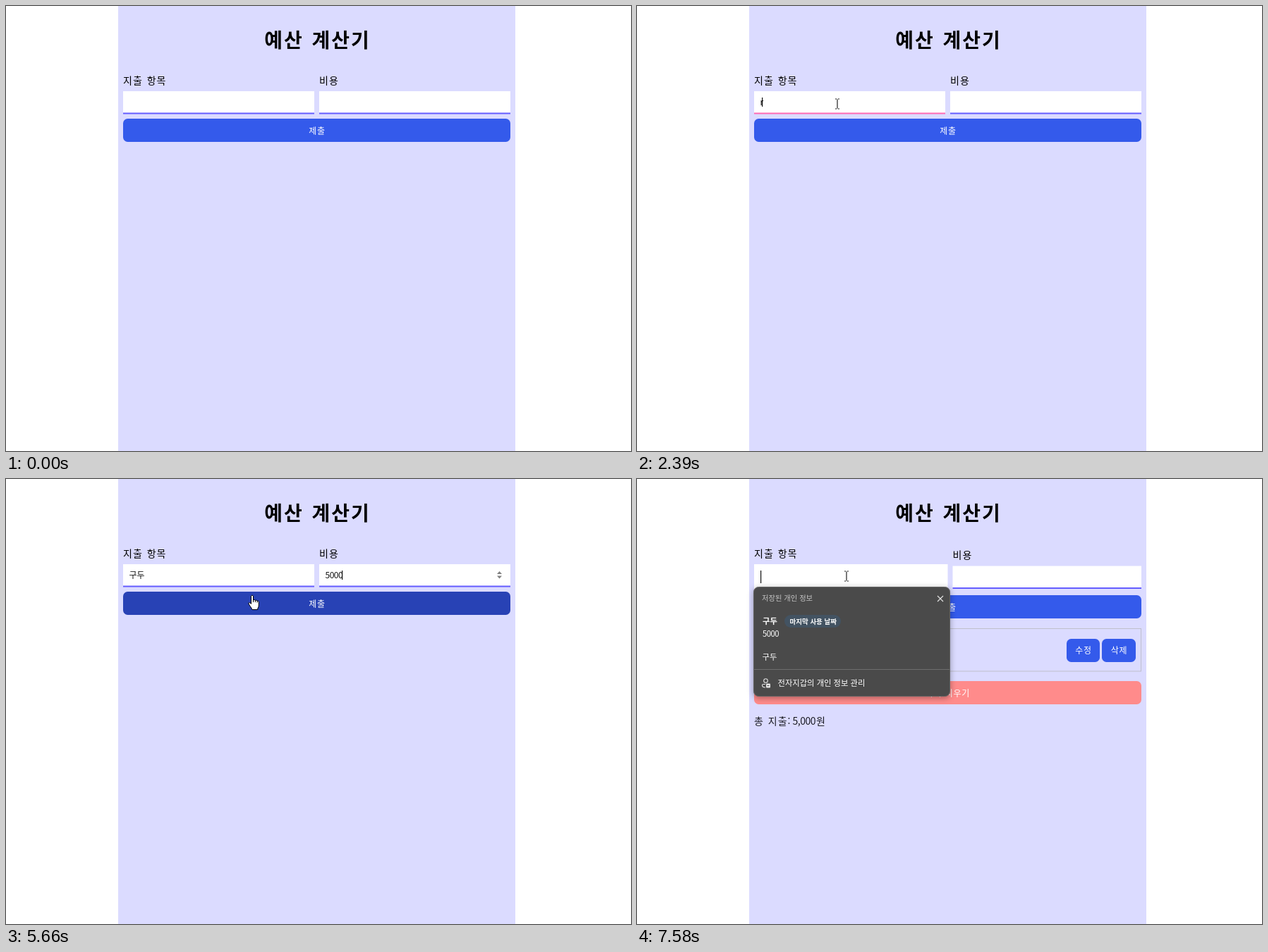
An HTML page for the animation above (8 s loop, 886 by 632 pixels).

```html
<!DOCTYPE html>
<html lang="ko">
<head>
<meta charset="utf-8">
<title>예산 계산기</title>
<style>
  html, body { margin: 0; width: 100%; height: 100%; overflow: hidden; background: #fff; }
  svg { display: block; width: 886px; height: 632px; }
  text { font: 14px "Noto Sans CJK KR", "Noto Sans CJK", "Noto Sans", sans-serif; fill: #1a1a22; white-space: pre; }
  .mid { text-anchor: middle; }
  .spaced { letter-spacing: 1px; word-spacing: 1px; }
  .num { letter-spacing: -.5px; }
  h1, .title { font-size: 28px; font-weight: 700; letter-spacing: 2px; word-spacing: 2px; fill: #000; }
  .label { font-weight: 500; fill: #000; }
  .btn { fill: #345aeb; }
  .btn-text { font-size: 12px; letter-spacing: .8px; fill: #fff; }
  .field-text { font-size: 12px; fill: #111; }
  .popup text { fill: #fff; font-size: 11.3px; }
  .popup .head { font-size: 10.3px; fill: #c4c4c4; }
  .popup .bold { font-weight: 700; }
  .popup .tag { font-size: 9.5px; font-weight: 700; }
  .popup { filter: drop-shadow(0 2px 4px rgba(0, 0, 0, .35)); }
  .line { fill: none; stroke: #e4e4e4; stroke-width: 1.1; }
</style>
</head>
<body>
<svg viewBox="0 0 886 632">
  <rect x="159" width="563" height="632" fill="#dbdbff"/>
  <text class="title mid" x="441.5" y="59">예산 계산기</text>

  <text class="label spaced" x="166" y="110.5">지출 항목</text>
  <rect id="itemBox" x="166" y="121" fill="#fff"/>
  <rect id="itemLine" x="166" height="2"/>
  <text id="item" class="field-text" x="174.5" y="141"></text>

  <g id="cost">
    <text id="costLabel" class="label spaced" y="110.5">비용</text>
    <rect id="costBox" y="121" height="32" fill="#fff"/>
    <rect id="costLine" y="151.5" height="2" fill="#645cff"/>
    <text id="costText" class="field-text num" x="452.5" y="140.5"></text>
    <path id="spin" d="M696 135l3.5-4 3.5 4zM696 137.500l3.500 4 3.500-4z" fill="#808080"/>
  </g>
  <rect id="caret" y="130" width="1.2" fill="#111"/>

  <g id="lower">
    <rect id="submit" x="166" y="160" width="549" height="33" rx="6.500"/>
    <text class="btn-text mid" x="441" y="181.500">제출</text>
    <g id="result">
      <rect x="166.500" y="207.500" width="548" height="60.500" fill="none" stroke="#bfbfcb"/>
      <text x="174" y="243" letter-spacing=".7">구두</text>
      <text class="num" x="390.500" y="243">5000</text>
      <rect class="btn" x="609" y="222" width="47" height="33" rx="6.500"/>
      <rect class="btn" x="659" y="222" width="48" height="33" rx="6.500"/>
      <text class="btn-text mid" x="633" y="243">수정</text>
      <text class="btn-text mid" x="683.500" y="243">삭제</text>
      <rect x="166" y="282" width="549" height="33" rx="6.500" fill="#ff8b8b"/>
      <text class="btn-text mid" x="440.500" y="303.500">목록 지우기</text>
      <text class="spaced" x="166" y="343.500">총 지출:</text>
      <text class="num" x="220.500" y="343.500">5,000</text>
      <text x="254" y="343.500">원</text>
    </g>
  </g>

  <g id="popup" class="popup">
    <rect x="165.500" y="153.500" width="278" height="155" rx="7" fill="#4a4a4a" stroke="#626262"/>
    <text class="head" x="177" y="173">저장된 개인 정보</text>
    <path class="line" d="M426 166l8 8m0-8l-8 8"/>
    <text class="bold" x="178" y="205.500">구두</text>
    <rect x="209" y="193" width="80" height="18" rx="9" fill="#435362"/>
    <text class="tag" x="216.500" y="205.500">마지막 사용 날짜</text>
    <text class="num" x="178" y="223.500">5000</text>
    <text x="177.500" y="256.500">구두</text>
    <path d="M166 270.500h277" stroke="#6e6e6e"/>
    <circle class="line" cx="182.500" cy="286.500" r="2.800"/>
    <path class="line" d="M182 291.500h-3q-1.500 0-1.500 1.500 0 3 4.500 3"/>
    <rect x="183" y="290.500" width="6" height="6" rx="1" fill="#e4e4e4"/>
    <path d="M184.500 293.500h3" stroke="#4a4a4a"/>
    <text x="199.500" y="293.500">전자지갑의 개인 정보 관리</text>
  </g>

  <g id="pointer">
    <path id="arrow" d="M0 0V16.500L3.800 13l2.500 6 2.600-1.100-2.500-5.900H11.500Z" fill="#fff" stroke="#000"/>
    <g id="hand" stroke="#000" stroke-linejoin="round">
      <path d="M-1.500 1.200q1.500-2.400 3 0V7q1.800-1.400 2.800.4 2-1 2.800.8 2.200-.6 2.200 1.400V14q0 3-1.500 5v1.500H0q-1-2.500-3-5-2.200-3-2.200-4.200 1.800-1.800 3.700 1Z" fill="#fff"/>
      <path d="M1.500 7v3M4.300 7.400V10M7.100 8.200V10.500" fill="none"/>
    </g>
    <path id="beam" d="M-3-7h2.200M.8-7H3M0-6.500v13M-3 7h2.200M.8 7H3" fill="none" stroke="#222" stroke-width="1.200"/>
  </g>
  <circle id="press" r="10.500" fill="#ff0" opacity=".55"/>
</svg>

<script>
const LOOP = 8000, STEP = 50;
const el = {};
document.querySelectorAll('[id]').forEach(n => el[n.id] = n);

// Each track holds [start time, value].
const itemTrack = [[0, ''], [1930, 'r'], [2030, 'rn'], [2390, 'r'], [2540, ''], [2790, 'ㄱ'],
  [2960, '구'], [3040, '굳'], [3110, '구두'], [5960, '']];
const costTrack = [[0, ''], [3970, '5'], [4170, '50'], [4320, '500'], [4490, '5000'], [5960, '']];
const caretTrack = [[0, 0], [870, 175], [1380, 0], [1880, 175], [1930, 178], [2030, 183], [2390, 177],
  [2540, 175], [2590, 0], [2790, 186], [3110, 197], [3260, 452], [3820, 0], [3970, 458], [4170, 464],
  [4320, 470], [4490, 476], [5040, 0], [5540, 476], [5860, 0], [6530, 175], [7070, 0], [7580, 175]];
// Pointer moves: quadratic curves with a slowing end.
const moves = [
  { from: 100, to: 750, pts: [[775, 506], [360, 260], [284, 139]] },
  { from: 5240, to: 5610, pts: [[284, 139], [320, 170], [349, 165]] },
  { from: 6160, to: 6460, pts: [[349, 165], [325, 150], [297, 138]] }
];

const at = (track, t) => track.filter(k => k[0] <= t).pop()[1];
const within = (t, a, b) => t >= a && t < b;
const clamp = v => Math.max(0, Math.min(1, v));
const show = (node, on) => node.setAttribute('visibility', on ? 'visible' : 'hidden');
const set = (node, attrs) => { for (const k in attrs) node.setAttribute(k, attrs[k]); };

function pointerAt(t) {
  const m = moves.filter(k => k.from <= t).pop() || moves[0];
  const held = Math.floor((t - m.from) / STEP) * STEP;
  const u = Math.sin(clamp(held / (m.to - m.from)) * Math.PI / 2), v = 1 - u;
  return [0, 1].map(i => v * v * m.pts[0][i] + 2 * u * v * m.pts[1][i] + u * u * m.pts[2][i]);
}

function drawForm(t) {
  const grown = t >= 6530;
  const focused = within(t, 870, 3260) || grown;
  const width = grown ? 274.5 : 271, height = grown ? 37 : 32;
  set(el.itemBox, { width, height });
  set(el.itemLine, { width, y: 119.5 + height, fill: focused ? '#ff69b4' : '#645cff' });
  el.item.textContent = at(itemTrack, t);

  const left = grown ? 447.5 : 444;
  set(el.cost, { transform: `translate(0 ${grown ? 2.5 : 0})` });
  set(el.costLabel, { x: left });
  for (const box of [el.costBox, el.costLine]) set(box, { x: left, width: 715 - left });
  el.costText.textContent = at(costTrack, t);
  show(el.spin, within(t, 3260, 5910));

  const caret = at(caretTrack, t);
  set(el.caret, { x: caret, height: grown ? 18 : 13 });
  show(el.caret, caret > 0);
}

function drawLower(t) {
  set(el.lower, { transform: `translate(0 ${t >= 6530 ? 5 : 0})` });
  const dark = clamp((t - 5390) / 270) - clamp((t - 6230) / 270);
  const mix = (a, b) => Math.round(a + (b - a) * dark);
  set(el.submit, { fill: `rgb(${mix(52, 40)},${mix(90, 66)},${mix(235, 181)})` });
  show(el.result, t >= 5960);
  show(el.popup, t >= 6580);
  set(el.popup, { opacity: t < 6630 ? .6 : 1 });
}

function drawPointer(t) {
  const [x, y] = pointerAt(t);
  const inX = within(x, 166, 715);
  const kind = inX && within(y, 121, 153) ? 'beam' : inX && within(y, 160, 193) ? 'hand' : 'arrow';
  for (const k of ['arrow', 'hand', 'beam']) set(el[k], { display: k === kind ? 'inline' : 'none' });
  set(el.pointer, { transform: `translate(${x} ${y})` });
  show(el.pointer, t >= 100);
  set(el.press, { cx: x - 1.7, cy: y - .7 });
  show(el.press, within(t, 820, 920) || within(t, 5860, 6010) || within(t, 6480, 6630));
}

const start = performance.now();
function frame() {
  const t = (performance.now() - start) % LOOP;
  drawForm(t);
  drawLower(t);
  drawPointer(t);
  requestAnimationFrame(frame);
}
frame();
</script>
</body>
</html>
```
